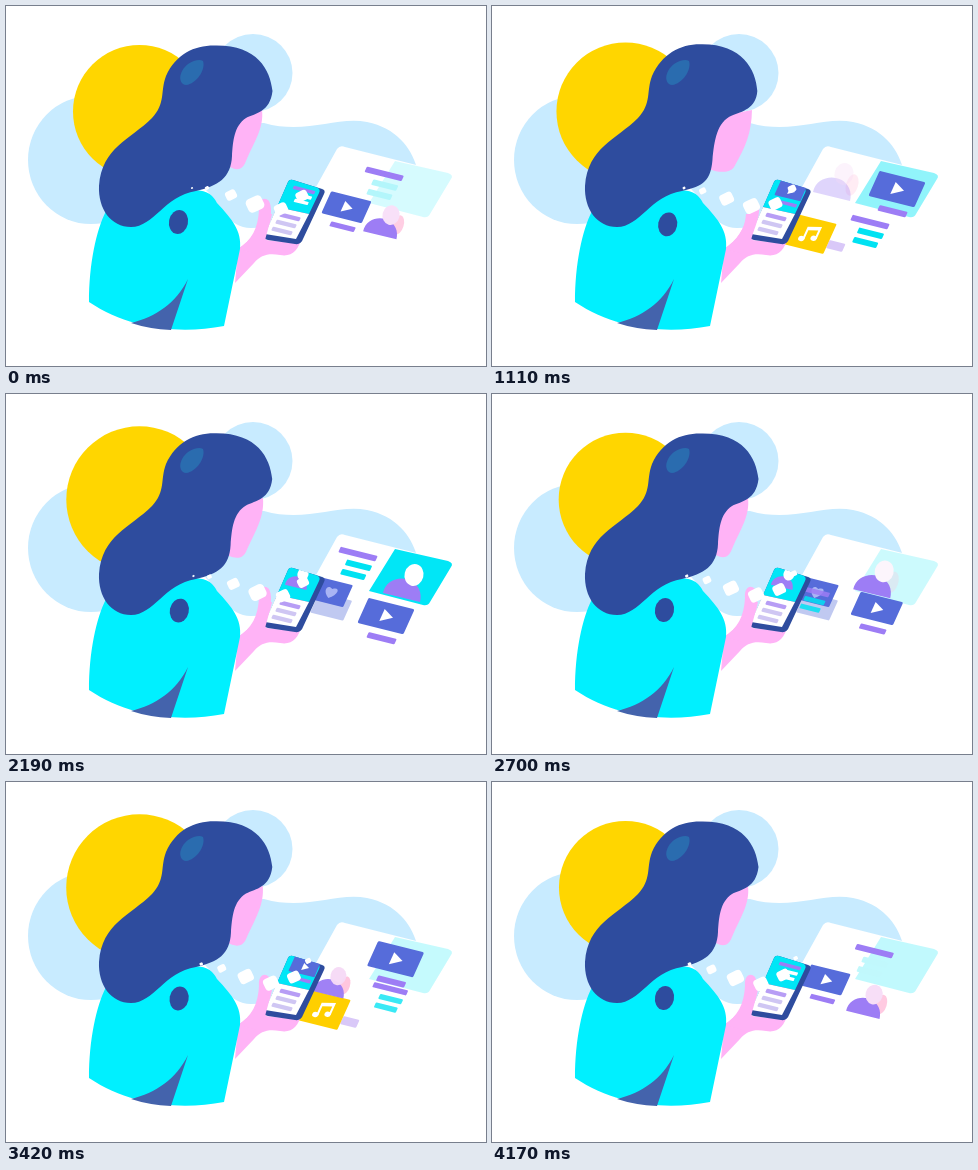
Write an HTML page with a canvas that moves like this. It is 480 px wide and 360 px high and loops after 4.2 s.

```html
<!DOCTYPE html>
<html lang="en">
<head>
<meta charset="utf-8">
<title>Browsing on a phone</title>
<style>
html, body { margin: 0; width: 100%; height: 100%; overflow: hidden; background: #fff; }
canvas { display: block; }
</style>
</head>
<body>
<canvas id="stage" width="480" height="360"></canvas>
<script>
const ctx = document.getElementById('stage').getContext('2d');
const LOOP = 4200, STEP = 700;
const SKY = '#c8ebff', NAVY = '#2e4c9e', CYAN = '#00f0ff', PINK = '#ffb3f6',
      PURPLE = '#9d7df5', BLUE = '#566cda', YELLOW = '#ffd600';

const mix = (a, b, k) => a + (b - a) * k;
const clamp = v => Math.max(0, Math.min(1, v));

// Linear keyframes: time, value, time, value, ...
function keys(t, ...k) {
  if (t <= k[0]) return k[1];
  for (let i = 2; i < k.length; i += 2)
    if (t <= k[i]) return mix(k[i - 1], k[i + 1], (t - k[i - 2]) / (k[i] - k[i - 2]));
  return k[k.length - 1];
}

function shape(d, color) {
  ctx.fillStyle = color;
  ctx.fill(new Path2D(d));
}

function oval(x, y, rx, ry, color, turn = 0) {
  ctx.fillStyle = color;
  ctx.beginPath();
  ctx.ellipse(x, y, rx, ry, turn, 0, 7);
  ctx.fill();
}

function box(x, y, w, h, r, color) {
  ctx.fillStyle = color;
  ctx.beginPath();
  ctx.roundRect(x - w / 2, y - h / 2, w, h, r);
  ctx.fill();
}

// Draw inside a moved, scaled and optionally slanted frame
function place(x, y, scale, alpha, slant, draw) {
  if (alpha <= 0) return;
  ctx.save();
  ctx.globalAlpha *= alpha;
  ctx.translate(x, y);
  ctx.scale(scale, scale);
  if (slant) ctx.transform(1, .25, -.45, 1, 0, 0);
  draw();
  ctx.restore();
}

// Slots: phone, below, cyan panel, white panel.
// onCyan tells how much of the item lies on the cyan panel.
const items = {
  play: {
    slots: [[300, 180], [380, 222], [405, 183], [357, 165]],
    draw(x, y, scale, alpha) {
      place(x, y, scale, alpha, true, () => {
        box(0, 0, 46, 25, 1.5, BLUE);
        box(5, 21, 28, 5.5, 1, PURPLE);
        shape('M-4-6L7 0L-4 6Z', '#fff');
      });
    }
  },
  person: {
    slots: [[305, 196], [359, 247], [396, 203], [340, 190]],
    draw(x, y, scale, alpha, onCyan) {
      place(x, y, scale, alpha, false, () => {
        ctx.save();
        ctx.globalAlpha *= 1 - onCyan;
        oval(20, -11, 6, 11, '#ffc4dd', .3);
        ctx.restore();
        shape('M-19-4C-15-22 10-23 17-8C19-4 19 1 18 5Z', PURPLE);
        const rb = mix(246, 255, onCyan);
        oval(12, -22, 9.5, 11, `rgb(${rb},${mix(218, 255, onCyan)},${rb})`, .25);
      });
    }
  },
  text: {
    slots: [[300, 190], [378, 216], [405, 176], [352, 160]],
    draw(x, y, scale, alpha, onCyan) {
      const white = Math.sqrt(onCyan);
      const line = `rgb(${255 * white},${mix(226, 255, white)},${mix(242, 255, white)})`;
      place(x, y, scale, alpha, true, () => {
        box(0, 0, 37, 5.5, 1, PURPLE);
        box(5, 10, 25, 5.5, 1, line);
        box(4, 19.5, 24, 5.5, 1, line);
      });
    }
  }
};
const names = ['person', 'play', 'text'];   // order in which they reach the cyan panel

function background(t) {
  oval(85, 154, 63, 64, SKY);
  oval(247, 67, 39.5, 39, SKY);
  shape('M160 120L258 117C300 129 330 110 361 116C390 122 405 141 411 162L318 183C290 190 285 222 245 222C222 222 216 200 200 184Z', SKY);
  const r = mix(66.5, 73.5, (1 - Math.cos(t * Math.PI / STEP)) / 2);
  oval(133.5, 105.5, r, r, YELLOW);
}

function panel(t) {
  shape('M331 143Q334 139 339 141L442 167Q448 169 445 173L424 208Q422 212 417 211L310 181Z', '#fff');
  ctx.globalAlpha = keys(t % STEP, 0, .15, 90, 1, 130, .78, 600, .2, 660, .28, 700, .15);
  shape('M389 155L442 167Q448 169 445 173L424 208Q422 212 417 211L363 197Z', '#00e6f6');
  ctx.globalAlpha = 1;
}

function drawHeart(t) {
  const out = keys(t % 2100, 20, 0, 90, 1, 600, 1, 660, .8, 730, 0);
  place(mix(302, 325, out), mix(194, 198, out), 1, clamp(out * 2), true, () => {
    ctx.save();
    ctx.globalAlpha *= .5;
    box(6, 13, 33, 20, 1, '#8294e4');
    ctx.restore();
    box(0, 0, 34, 22, 1, BLUE);
    shape('M0 6C-9 0-6-7 0-3C6-7 9 0 0 6Z', '#a9b4f4');
  });
}

function drawMusic(t) {
  const out = keys(t % 2100, 620, 0, 660, .1, 740, 1, 1330, 1, 1450, 0);
  place(mix(286, 318, out), mix(220, 228, out), 1, clamp(out * 10), true, () => {
    box(28, 5, 16, 8, 1, '#d9c8f8');
    box(0, 0, 40, 30, 1, '#ffcf00');
    oval(-6, 6, 3, 2.5, '#fff');
    oval(5, 3, 3, 2.5, '#fff');
    shape('M-5 6V-6L8-9V3H6V-5L-3-3V6Z', '#fff');
  });
}

function content(cycle, phase) {
  const move = keys(phase, 400, 0, 510, .28, 570, .4, 610, .5, 700, 1);
  const climb = move ** 1.3;
  names.forEach((name, i) => {
    const { slots, draw } = items[name];
    const slot = 1 + (cycle - i + 4) % 3;
    const go = (from, k, scale, alpha, onCyan) => {
      const [a, b] = [slots[from], slots[from + 1]];
      draw(mix(a[0], b[0], k), mix(a[1], b[1], k), scale, alpha, onCyan);
    };
    if (slot === 1) go(1, climb, 1 - .1 * Math.sin(Math.PI * move), 1, climb ** 2);
    if (slot === 2) go(2, move, 1, 1, 1 - move);
    if (slot === 3) {
      draw(...slots[3], 1, keys(phase, 50, 1, 450, 0), 0);
      go(0, move, mix(.75, 1, move), clamp(move * 3), 0);
    }
  });
}

function phone(cycle) {
  shape('M282 176Q283 173 287 174L316 183Q320 184 318 188L297 233Q295 239 289 238L262 234Q257 233 259 229Z', NAVY);
  shape('M282 176Q283 173 287 174L311 181.5Q315 183 313 187L303 208L271 201Z', '#00e6f6');
  shape('M271 201L303 208L290 233L259 228Z', '#fff');
  for (let i = 0; i < 3; i++)
    place(284 - i * 4, 211 + i * 7, 1, 1, true, () => box(0, 0, 20, 4, 1, i < 1 ? '#b79df5' : '#cfc6f3'));
  ctx.save();
  ctx.clip(new Path2D('M284 173L314 182L303 208L272 200Z'));
  const name = names[cycle];
  const [x, y] = { person: [290, 193], play: [299, 185], text: [298, 184] }[name];
  items[name].draw(x, y, .58, 1, 1);
  ctx.restore();
}

function palm() {
  shape('M229 277L232 243C245 234 253 224 254 208L266 208L260 234L286 237L294 208C300 211 299 221 296 231C292 245 286 251 274 249C262 247 255 249 248 257Z', PINK);
}

function thumb(k) {
  const x = 9 * k, y = 10 * k;
  shape(`M232 243C246 234 252 222 ${253 + x} ${204 + y}C${252 + x} ${194 + y / 2} ${258 + x} ${190 + y} ${263 + x} ${195 + y}C${268 + x / 3} ${204 + y} 263 220 259 234L250 248Z`, PINK);
}

function body(p) {
  shape('M83 296C83 258 90 225 100 205L180 185C200 182 207 189 211 197C226 213 236 225 234 243L218 320C175 328 125 324 83 296Z', CYAN);
  shape('M125 317C150 311 170 297 182 273L165 324Q143 323 125 317Z', '#4463ac');
  oval(172.5 + 4 * p, 216 + 3 * p, 9.5, 12, NAVY, .2);
}

function head(p) {
  const f = (a, b) => mix(a, b, p).toFixed(2);
  shape(`M220 112L${f(256, 261)} 104C${f(258, 260)} ${f(122, 128)} ${f(249, 255)} ${f(134, 142)} ${f(240, 244)} ${f(155, 160)}C${f(236, 240)} ${f(166, 169)} ${f(229, 226)} ${f(164, 167)} ${f(222, 216)} ${f(160, 164)}Z`, PINK);
  shape(`M160 70C170 48 188 ${f(39.5, 38)} 208 ${f(39.5, 38)}C${f(251, 249)} ${f(38.5, 37)} 264 63 ${f(266.5, 265)} 85C264 ${f(106, 102)} 250 ${f(107, 105)} 240 ${f(112, 109)}C${f(228, 224)} ${f(120, 115)} ${f(227, 221)} 135 ${f(226, 219)} ${f(150, 155)}C${f(225, 217)} ${f(172, 175)} 212 180 190 185C158 190 148 221 125 221C105 221 92 203 93 180C96 141 124 134 146 112C160 97 154 86 160 70Z`, NAVY);
  shape('M197 55C200 64 190 78 180 79C172 78 172 66 182 58C188 54 194 53 197 55Z', '#2a6caf');
}

// x, y, size along the trail from the ear to the phone
const trail = [[186, 182, 2], [201, 182, 4], [225, 189, 11], [249, 198, 17], [275, 203, 13], [296, 190, 12], [306, 172, 2]];

function sparks(t) {
  const k = keys(t % STEP, 0, 0, 130, .14, 600, .58, 660, .68, 700, 1);
  for (let i = 0; i < trail.length - 1; i++) {
    const [x, y, s] = trail[i].map((v, j) => mix(v, trail[i + 1][j], k));
    ctx.save();
    ctx.translate(x, y);
    ctx.rotate(-.45);
    box(0, 0, s, s * .85, s * .25, '#fff');
    ctx.restore();
  }
}

function frame(now) {
  const t = now % LOOP;
  const late = (t + 2100 - 90) % 2100;
  const cycle = Math.floor(late / STEP);
  const nod = keys(t, 0, 0, 660, .3, 1300, 1, 1530, 1, 2190, .2, 2700, 0, 3420, .15, 4170, 0);
  const swipe = keys(t, 950, 0, 1350, 1, 1600, 1, 2000, 0);

  ctx.fillStyle = '#fff';
  ctx.fillRect(0, 0, 480, 360);
  background(t);
  panel(t);
  drawHeart(t);
  drawMusic(t);
  content(cycle, late % STEP);
  palm();
  phone(cycle);
  thumb(swipe);
  body(nod);
  head(nod);
  sparks(t);
}

const start = performance.now();
function tick() {
  frame(performance.now() - start);
  requestAnimationFrame(tick);
}
tick();
</script>
</body>
</html>
```
